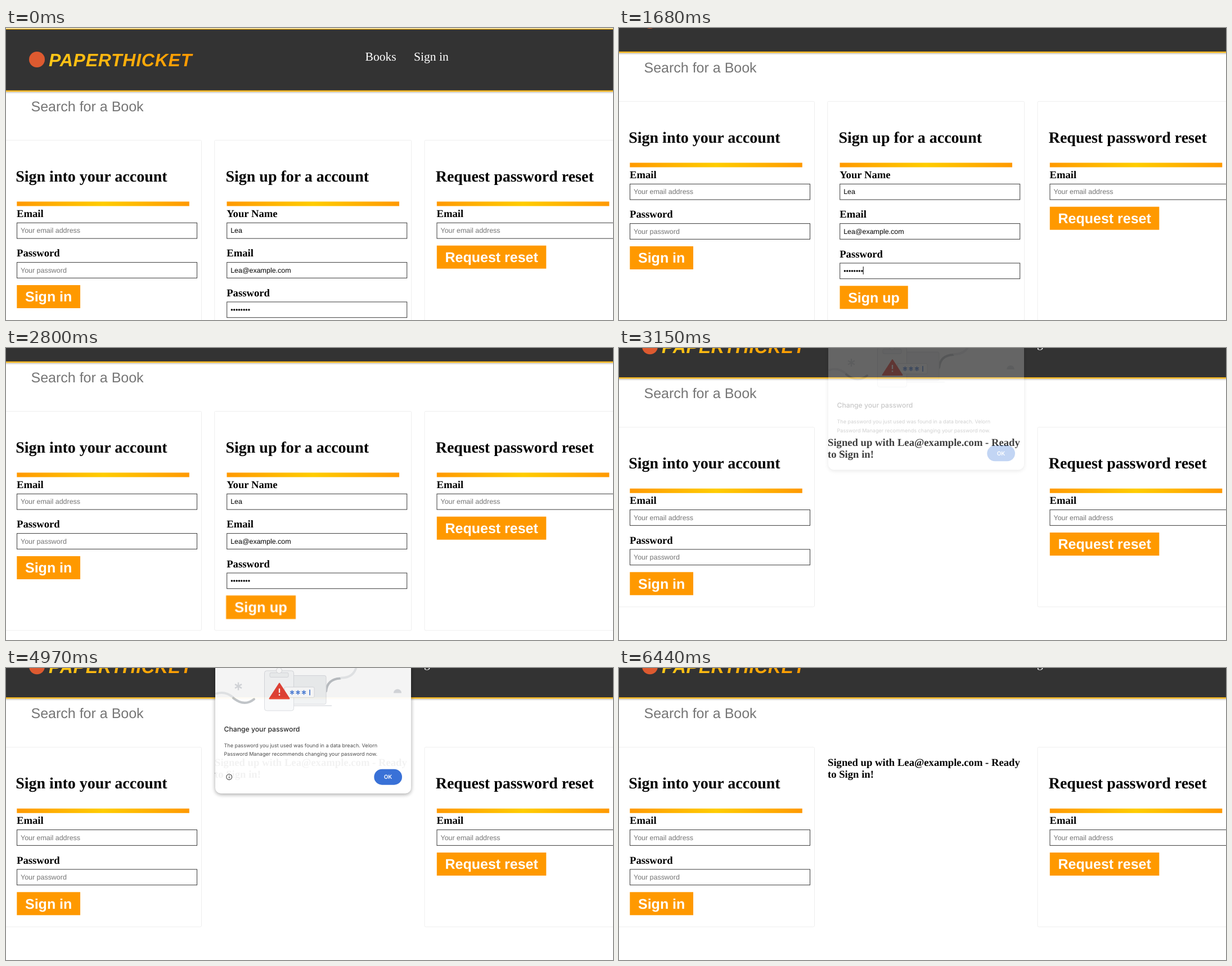
An HTML page for the animation above (8 s loop, 1079 by 519 pixels).

```html
<!DOCTYPE html>
<html lang="en">
<head>
<meta charset="utf-8">
<title>Book shop sign up</title>
<style>
  html, body { margin: 0; width: 100%; height: 100%; overflow: hidden; background: #fff; }
  svg { display: block; width: 1079px; height: 519px; }
  text { white-space: pre; text-rendering: geometricPrecision; }

  .serif { font-family: "Liberation Serif", "Times New Roman", serif; }
  .sans { font-family: "Liberation Sans", Arial, sans-serif; }
  .ui { font-family: Inter, Roboto, sans-serif; }
  .logo { font-size: 32px; font-weight: bold; font-style: italic; letter-spacing: .75px; fill: url(#gold); }
  .nav { font-size: 21.6px; fill: #fff; }
  .search { font-size: 25px; fill: #757575; }
  .title { font-size: 28px; font-weight: bold; }
  .label { font-size: 18.67px; font-weight: bold; }
  .value { font-size: 12.44px; }
  .hint { fill: #757575; }
  .btn { font-size: 25px; font-weight: bold; fill: #fff; }
  .field { fill: #fff; stroke: #3a3a3a; }
  .frame { fill: none; stroke: #eee; }

  .page, .before, .after, .caret, .dialog { animation: 8s step-end -2ms infinite; }
  .page { animation-name: scroll; }
  .before { animation-name: before; }
  .after { animation-name: after; }
  .caret { animation-name: blink; }
  .dialog { animation-name: dialog; }
  .grow { transform-box: fill-box; transform-origin: center; animation: grow 8s linear -2ms infinite; }
  .ok { animation: ok 8s linear -2ms infinite; }
  .sheet { filter: drop-shadow(0 2px 3px rgba(0, 0, 0, .26)) drop-shadow(0 1px 5px rgba(0, 0, 0, .14)); }

  @keyframes scroll {
    0% { transform: translateY(0); }
    19.25% { transform: translateY(-14px); }
    20.125% { transform: translateY(-45px); }
    21% { transform: translateY(-69px); }
    21.875% { transform: translateY(-82px); }
    22.75% { transform: translateY(-87px); }
    35.875%, 100% { transform: translateY(-58.7px); }
  }
  @keyframes before {
    0% { visibility: visible; }
    35.875%, 100% { visibility: hidden; }
  }
  @keyframes after {
    0% { visibility: hidden; }
    35.875%, 100% { visibility: visible; }
  }
  @keyframes blink {
    0% { opacity: 0; }
    7.875% { opacity: 1; }
    14% { opacity: 0; }
    21% { opacity: 1; }
    27.125%, 100% { opacity: 0; }
  }
  @keyframes grow {
    0%, 27.125% { transform: scale(1); animation-timing-function: ease; }
    34.125%, 100% { transform: scale(1.022); }
  }
  @keyframes dialog {
    0% { opacity: 0; transform: translateY(-10px); }
    39.375% { opacity: .25; transform: translateY(-7px); }
    40.25% { opacity: .65; transform: translateY(-3px); }
    41.125% { opacity: .92; transform: translateY(-1px); }
    42% { opacity: 1; transform: none; }
    61.25% { opacity: .99; transform: translateY(-.2px); }
    62.125% { opacity: .95; transform: translateY(-.6px); }
    63% { opacity: .68; transform: translateY(-3px); }
    63.875% { opacity: .28; transform: translateY(-7px); }
    64.75%, 100% { opacity: 0; transform: translateY(-10px); }
  }
  @keyframes ok {
    0%, 54.25% { fill: #0b57d0; }
    56.875%, 100% { fill: #2f6ad5; }
  }
</style>
</head>
<body>
<svg viewBox="0 0 1079 519" width="1079" height="519">
  <defs>
    <linearGradient id="gold" gradientUnits="userSpaceOnUse" x1="77" x2="334">
      <stop stop-color="#ffc818"/><stop offset="1" stop-color="#ff9900"/>
    </linearGradient>
    <linearGradient id="rule">
      <stop stop-color="#ff9900"/><stop offset=".5" stop-color="#ffcc00"/><stop offset="1" stop-color="#ff9900"/>
    </linearGradient>
    <linearGradient id="shade" x2="0" y2="1">
      <stop stop-color="#000" stop-opacity=".22"/><stop offset="1" stop-color="#000" stop-opacity="0"/>
    </linearGradient>
  </defs>

  <g class="page">
    <rect y="113" width="1079" height="4" fill="url(#shade)"/>
    <rect y="1" width="1079" height="112.3" fill="#f9bb22"/>
    <rect y="2.6" width="1079" height="108.2" fill="#333"/>
    <circle cx="55" cy="56" r="14" fill="#dd5a30"/>
    <text class="sans logo" x="76" y="67.5">PAPERTHICKET</text>
    <g class="serif nav">
      <text x="638.5" y="57.5">Books</text>
      <text x="725" y="57.5">Sign in</text>
    </g>
    <text class="sans search" x="44.5" y="148">Search for a Book</text>
    <g id="cards"></g>
    <g class="after serif label">
      <text x="371" y="232.7">Signed up with Lea@example.com - Ready</text>
      <text x="371" y="253.9">to Sign in!</text>
    </g>
  </g>

  <g class="dialog">
    <rect class="sheet" x="372" y="-60" width="348" height="283.5" rx="10" fill="#fff"/>
    <g fill="none" stroke-linecap="round" stroke-width="4">
      <path d="M374 46Q390 41 404 53" stroke="#e8eaed"/>
      <path d="M404 54Q424 70 441 56" stroke="#bdc1c6"/>
      <path d="M569 42Q571 20 594 19" stroke="#bdc1c6"/>
      <path d="M596 18Q618 18 623 -2" stroke="#e8eaed"/>
    </g>
    <path d="M413 26v14M407 29.5l12 7M419 29.5l-12 7" stroke="#dadce0" stroke-width="2.4"/>
    <path d="M689 45a7 7 0 0 1 14 0z" fill="#dadce0"/>
    <g fill="#f1f3f4" stroke="#dadce0">
      <rect x="500" y="14" width="69" height="51" rx="3"/>
      <path d="M500 67.5H579" stroke-width="1.5"/>
      <rect x="459.5" y="5.5" width="52" height="71" rx="4" fill="#f8f9fa"/>
      <rect x="469" y="9" width="33" height="8" rx="2"/>
      <circle cx="485.5" cy="5" r="5" fill="#fff"/>
      <rect x="495" y="34.500" width="53" height="18.500" rx="2" fill="#fff"/>
    </g>
    <path d="M508.500 40v8M505 42l7 4M512 42l-7 4M519 40v8M515.500 42l7 4M522.500 42l-7 4M529.500 40v8M526 42l7 4M533 42l-7 4M540 39v10" stroke="#3f76d8" stroke-width="1.6"/>
    <path d="M486 28L503.500 55H468.500z" fill="#e64235" stroke="#e64235" stroke-width="2" stroke-linejoin="round"/>
    <path d="M486 37v7.500M486 47v2.500" stroke="#fff" stroke-width="2.300"/>
    <g class="ui" fill="#1f1f1f">
      <text x="387.500" y="113.300" font-size="12.200" font-weight="500">Change your password</text>
      <g font-size="9.100" fill="#444">
        <text x="387.500" y="141.300">The password you just used was found in a data breach. Velorn</text>
        <text x="387.500" y="156.800">Password Manager recommends changing your password now.</text>
      </g>
    </g>
    <circle cx="396.700" cy="194.300" r="4.900" fill="none" stroke="#444" stroke-width="1.100"/>
    <path d="M396.700 193.500v3.300M396.700 191.400v1.200" stroke="#444" stroke-width="1.200"/>
    <rect class="ok" x="654.300" y="180.300" width="49.700" height="28" rx="14"/>
    <text class="ui" x="679" y="198" font-size="10" font-weight="600" fill="#fff" text-anchor="middle">OK</text>
  </g>
</svg>
<script>
  const text = (cls, x, y, s) => `<text class="${cls}" x="${x}" y="${y}">${s}</text>`;

  const frame = (x, bottom, cls) =>
    `<rect class="frame ${cls}" x="${x + .5}" y="199.5" width="350" height="${bottom - 199.5}" rx="2"/>`;

  const row = (x, i, [label, value, hint]) => {
    const y = 346.3 + i * 70.3;
    return text('serif label', x + 22, y - 10.3, label) +
      `<rect class="field" x="${x + 22.5}" y="${y}" width="320" height="27.8"/>` +
      text('sans value' + (hint ? ' hint' : ''), x + 29, y + 18, value);
  };

  const button = (x, y, width, s, cls = '') =>
    `<g class="${cls}"><rect x="${x + 22.3}" y="${y}" width="${width}" height="41" fill="#ff9900"/>` +
    text('sans btn', x + 37, y + 29.4, s) + '</g>';

  const card = (x, title, rows, action) =>
    text('serif title', x + 20.2, 273, title) +
    `<rect x="${x + 22.3}" y="308.5" width="306.5" height="8" fill="url(#rule)"/>` +
    rows.map((r, i) => row(x, i, r)).join('') + action;

  const left = -3, mid = 370.2, right = 743.5;
  const email = ['Email', 'Your email address', true];

  document.getElementById('cards').innerHTML =
    [left, right].map(x => frame(x, 589, 'before') + frame(x, 518.7, 'after')).join('') +
    card(left, 'Sign into your account',
      [email, ['Password', 'Your password', true]],
      button(left, 457, 112.7, 'Sign in')) +
    '<g class="before">' + frame(mid, 589, '') +
    card(mid, 'Sign up for a account',
      [['Your Name', 'Lea'], ['Email', 'Lea@example.com'], ['Password', '•'.repeat(8)]],
      button(mid, 527.3, 121.2, 'Sign up', 'grow')) +
    '<rect class="caret" x="433.7" y="493" width="1" height="14"/></g>' +
    card(right, 'Request password reset', [email],
      button(right, 386.7, 194.5, 'Request reset'));
</script>
</body>
</html>
```
